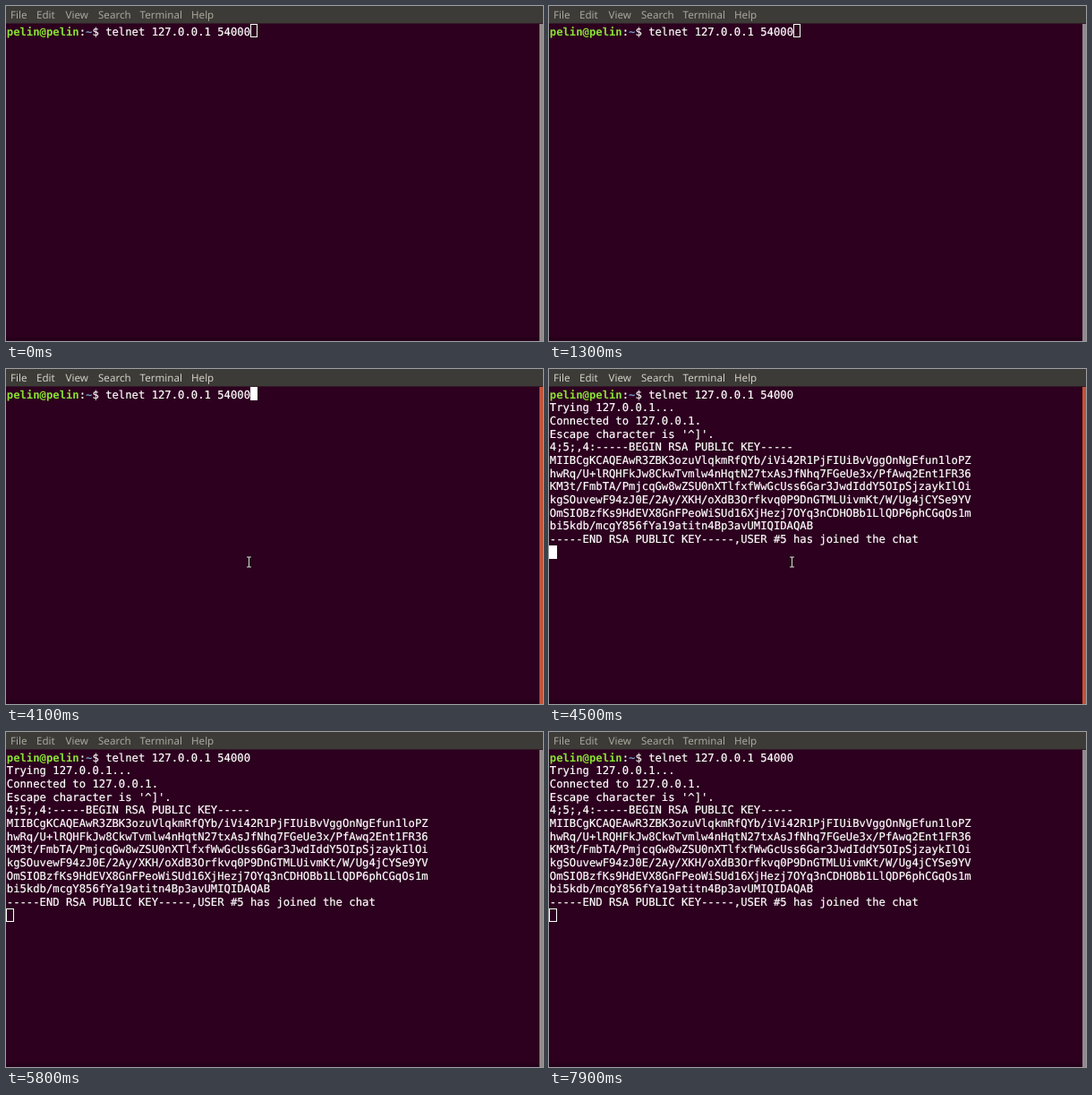
Write an HTML page that moves like this. It is 600 px wide and 374 px high and loops after 8 s.

```html
<!DOCTYPE html>
<html lang="en">
<head>
<meta charset="utf-8">
<title>Terminal session</title>
<style>
  html, body { margin: 0; width: 100%; height: 100%; overflow: hidden; background: #2c001e; }
  #stage { position: relative; width: 600px; height: 374px; overflow: hidden; text-rendering: geometricPrecision; }
  #stage > * { position: absolute; }
  #menu { left: 0; top: 0; width: 600px; height: 19px; background: #3c3b37; color: #aaa69d;
          border-bottom: 1px solid #331a29; font: 11.6px/21px "Noto Sans", "Open Sans", sans-serif; }
  #menu span { position: absolute; top: 0; white-space: pre; }
  #screen { left: .8px; top: 21.6px; margin: 0; color: #fff; -webkit-text-stroke: .2px;
            font: 12.22px/14.68px "DejaVu Sans Mono", monospace; }
  #screen b { -webkit-text-stroke: 0; }
  #screen b.user { color: #8ae234; }
  #screen b.path { color: #729fcf; }
  #edge { left: 0; top: 370px; width: 596px; height: 4px; background: #26001a; }
  #scroll { left: 596px; top: 20px; width: 4px; height: 354px; background: #938a8d; }
  #cursor { box-sizing: border-box; width: 8.5px; height: 15px; border: 1px solid #fff; }
  #pointer { left: 0; top: 0; width: 9px; height: 15px; }
  .focused #menu { color: #d3cfc6; }
  .focused #scroll { background: #c2533a; }
  .focused #cursor { background: #fff; }
</style>
</head>
<body>
<div id="stage">
  <div id="menu"></div>
  <div id="edge"></div>
  <div id="scroll"></div>
  <pre id="screen"><b class="user">pelin@pelin</b>:<b class="path">~</b>$ telnet 127.0.0.1 54000
<span id="reply">Trying 127.0.0.1...
Connected to 127.0.0.1.
Escape character is '^]'.
4;5;,4:-----BEGIN RSA PUBLIC KEY-----
MIIBCgKCAQEAwR3ZBK3ozuVlqkmRfQYb/iVi42R1PjFIUiBvVggOnNgEfun1loPZ
hwRq/U+lRQHFkJw8CkwTvmlw4nHqtN27txAsJfNhq7FGeUe3x/PfAwq2Ent1FR36
KM3t/FmbTA/PmjcqGw8wZSU0nXTlfxfWwGcUss6Gar3JwdIddY5OIpSjzaykIlOi
kgSOuvewF94zJ0E/2Ay/XKH/oXdB3Orfkvq0P9DnGTMLUivmKt/W/Ug4jCYSe9YV
OmSIOBzfKs9HdEVX8GnFPeoWiSUd16XjHezj7OYq3nCDHOBb1LlQDP6phCGqOs1m
bi5kdb/mcgY856fYa19atitn4Bp3avUMIQIDAQAB
-----END RSA PUBLIC KEY-----,USER #5 has joined the chat</span></pre>
  <div id="cursor"></div>
  <svg id="pointer" viewBox="-4.5 -7.5 9 15">
    <g fill="none">
      <path d="M-3 -5.5H3M-3 5.5H3M0 -5.5V5.5" stroke="#17000f" stroke-width="2.6"/>
      <path d="M-2.5 -5.5H2.5M-2.5 5.5H2.5M0 -5.5V5.5" stroke="#e4dfe2"/>
    </g>
  </svg>
</div>
<script>
const LOOP = 8000, STEP = 100, BLINK = 600;
const FOCUS = 3900, ENTER = 4500, BLUR = 5500;
const CELL_W = 7.357, CELL_H = 14.68;
const $ = id => document.getElementById(id);

const menuItems = { File: 5, Edit: 34, View: 66.5, Search: 103, Terminal: 149.5, Help: 207 };
for (const [label, x] of Object.entries(menuItems)) {
  const item = document.createElement('span');
  item.textContent = label;
  item.style.left = x + 'px';
  $('menu').append(item);
}

// Pointer waypoints: time, x, y
const route = [
  [3500, -10, 236], [3900, 262, 218], [4100, 271.5, 215.5], [4500, 271.5, 215.5],
  [5100, 251.5, 223.4], [5500, -10, 240]
];

function pointerAt(t) {
  const i = route.findIndex(p => p[0] > t);
  if (i < 1) return null;
  const [t0, x0, y0] = route[i - 1], [t1, x1, y1] = route[i];
  const u = (t - t0) / (t1 - t0), k = u * u * (3 - 2 * u);
  return [x0 + (x1 - x0) * k, y0 + (y1 - y0) * k];
}

function render(t) {
  const focused = t >= FOCUS && t < BLUR;
  const connected = t >= ENTER;
  const [col, row] = connected ? [0, 12] : [37, 0];
  const blinkStart = connected ? ENTER : FOCUS;
  const lit = !focused || Math.floor((t - blinkStart) / BLINK) % 2 === 0;

  $('stage').className = focused ? 'focused' : '';
  $('reply').style.visibility = connected ? 'visible' : 'hidden';
  const cursor = $('cursor').style;
  cursor.left = col * CELL_W + .4 + 'px';
  cursor.top = 20.4 + row * CELL_H + 'px';
  cursor.visibility = lit ? 'visible' : 'hidden';

  const pos = pointerAt(t), pointer = $('pointer').style;
  pointer.visibility = pos ? 'visible' : 'hidden';
  if (pos) pointer.transform = `translate(${Math.round(pos[0] - 4.5)}px, ${Math.round(pos[1] - 7.5)}px)`;
}

const start = performance.now();
function tick() {
  const t = (performance.now() - start) % LOOP;
  render(Math.floor(t / STEP) * STEP);
  requestAnimationFrame(tick);
}
tick();
</script>
</body>
</html>
```
